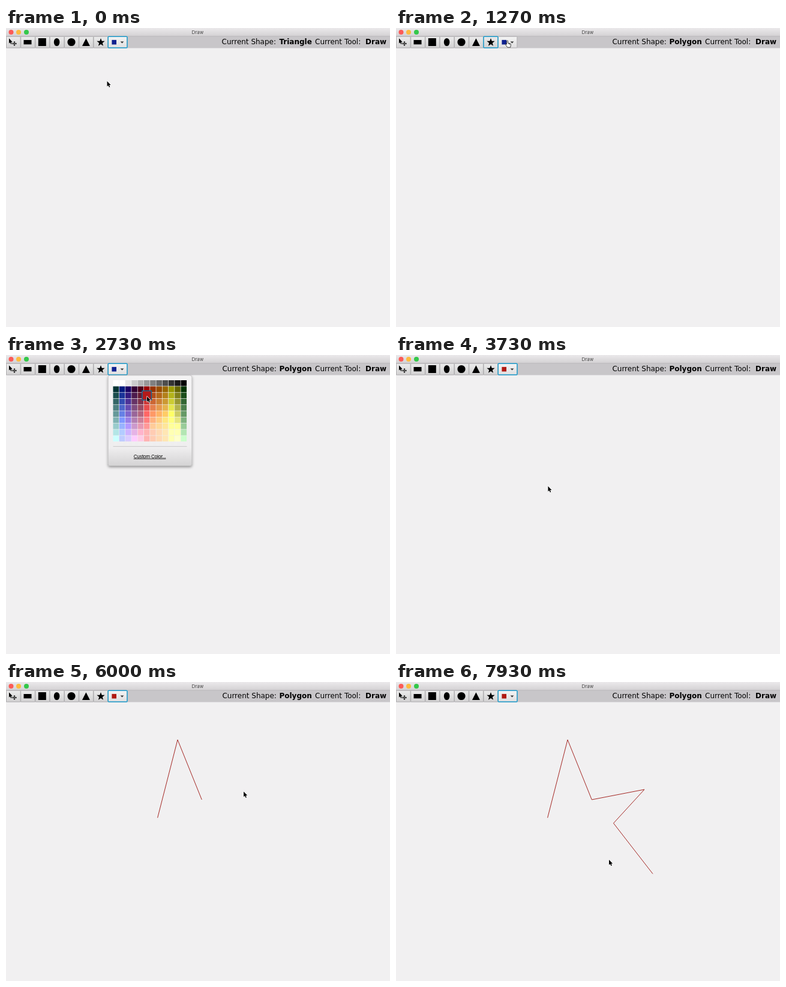
An HTML page for the animation above (8 s loop, 640 by 498 pixels).

```html
<!DOCTYPE html>
<html lang="en">
<head>
<meta charset="utf-8">
<title>Draw</title>
<style>
  html, body { margin: 0; width: 100%; height: 100%; overflow: hidden; background: #f1f0f1; }
  svg { display: block; width: 640px; height: 498px; }
  text { font: 12px "DejaVu Sans", Verdana, sans-serif; fill: #000; }
  .bold { font-weight: bold; }
  .small { font: 8px Inter, sans-serif; text-anchor: middle; }
  .title { fill: #444; }
  .custom { letter-spacing: -.3px; text-decoration: underline; }
  .end { text-anchor: end; }
</style>
</head>
<body>
<svg viewBox="0 0 640 498">
  <defs>
    <linearGradient id="bar" x2="0" y2="1">
      <stop stop-color="#ebe9eb"/><stop offset="1" stop-color="#d3d1d3"/>
    </linearGradient>
    <linearGradient id="face" x2="0" y2="1">
      <stop stop-color="#ececec"/><stop offset="1" stop-color="#d2d1d2"/>
    </linearGradient>
    <linearGradient id="lit" x2="0" y2="1">
      <stop stop-color="#f4f4f4"/><stop offset="1" stop-color="#e0dfe0"/>
    </linearGradient>
    <linearGradient id="sheet" x2="0" y2="1">
      <stop stop-color="#f4f3f4"/><stop offset=".8" stop-color="#efeeef"/><stop offset="1" stop-color="#d4d3d4"/>
    </linearGradient>
    <filter id="shadow" x="-10%" y="-10%" width="120%" height="125%">
      <feDropShadow dx="0" dy="2" stdDeviation="2" flood-opacity=".4"/>
    </filter>
    <path id="pointer" d="M0 0V8.9L2 7.1 3.4 10.3 4.9 9.7 3.5 6.5H6.2Z"/>
  </defs>

  <rect width="640" height="498" fill="#f1f0f1"/>
  <rect width="640" height="14" fill="url(#bar)"/>
  <rect y="14" width="640" height="19.5" fill="#c8c6c9"/>
  <path d="M0 13.7H640" stroke="#b3b1b3" stroke-width=".7"/>
  <circle cx="8.5" cy="7" r="4" fill="#fc5b57"/>
  <circle cx="21" cy="7" r="4" fill="#fdbc40"/>
  <circle cx="34" cy="7" r="4" fill="#34c84a"/>
  <text class="small title" x="319.5" y="10">Draw</text>

  <g id="buttons" stroke="#a9a8aa" stroke-width=".8"></g>
  <use href="#pointer" transform="translate(5 17.2) scale(.95)"/>
  <path d="M14 22l1.6 2H14.5V25.5H16V24.4L18 26 16 27.6V26.5H14.5V28H15.6L14 30 12.4 28H13.5V26.5H12V27.6L10 26 12 24.4V25.5H13.5V24H12.4Z"/>
  <rect x="29.5" y="20" width="13" height="7.3"/>
  <rect x="53.8" y="17" width="13" height="13"/>
  <ellipse cx="84.6" cy="23.5" rx="4.8" ry="6.6"/>
  <circle cx="109" cy="23.5" r="6.6"/>
  <path d="M133.4 17.2L139.9 30H126.9Z"/>
  <path id="star"/>
  <rect id="swatch" x="176.4" y="19.9" width="7.6" height="7.6"/>
  <path d="M190.6 22.4H196.4L193.5 25.4Z" fill="#333"/>
  <rect id="ring" y="14.2" height="18.8" rx="1.2" fill="none" stroke="#1f9fcf" stroke-width="1.5"/>

  <text id="label" y="27">Current Shape:</text>
  <text id="shape" class="bold end" x="509.8" y="27"></text>
  <text x="515" y="27">Current Tool:</text>
  <text class="bold" x="599" y="27">Draw</text>

  <path id="poly" fill="none" stroke="#a01c18" stroke-width=".95"/>

  <g id="popup">
    <rect x="170.2" y="34" width="139.6" height="150.6" rx="3" fill="url(#sheet)" stroke="#b9b8b9" stroke-width=".7" filter="url(#shadow)"/>
    <g id="cells"></g>
    <path d="M178.5 152.3H301.5" stroke="#c8c7c8"/>
    <text class="small custom" x="239.6" y="171.6">Custom Color...</text>
    <rect id="hover" width="15.4" height="15.4" stroke="#0b6f9c" stroke-width="1.4"/>
  </g>

  <g id="cursor" stroke-linejoin="round">
    <use id="arrow" href="#pointer" stroke="#fff" stroke-width="1.3" paint-order="stroke"/>
    <path id="hand" fill="#fff" stroke="#111" stroke-width=".8"
      d="M-1 6.4V.9a1 1 0 0 1 2 0V4.2l3.6.7q1.5.4 1.3 1.9L5.2 11.2H.3L-2.8 7.1q-.7-1.2.5-1.4ZM2.6 4.6V6.3M4.2 5V6.6"/>
  </g>
</svg>
<script>
const LOOP = 8000, STEP = 1000 / 15;
const STAR_CLICK = 860, OPEN = 1460, PICK = 2860;

const $ = id => document.getElementById(id);
const set = (el, attrs) => { for (const k in attrs) el.setAttribute(k, attrs[k]); return el; };
const addRect = (parent, attrs) =>
  parent.appendChild(set(document.createElementNS("http://www.w3.org/2000/svg", "rect"), attrs));
const show = (el, on) => el.style.display = on ? "" : "none";

// Toolbar: seven tools and a wider colour picker
const edge = i => i < 8 ? i * 24.28 : 202;
for (let i = 0; i < 8; i++)
  addRect($("buttons"), {
    x: edge(i) + .4, y: 14.2, width: edge(i + 1) - edge(i) - .6, height: 18.8, rx: 1,
    fill: i < 7 ? "url(#face)" : "url(#lit)"
  });

const starPoints = Array.from({ length: 10 }, (_, i) => {
  const a = i * Math.PI / 5, r = i % 2 ? 2.9 : 7;
  return `${158 + r * Math.sin(a)} ${24 - r * Math.cos(a)}`;
});
set($("star"), { d: `M${starPoints.join("L")}Z` });

// Palette: greys on top, then dark tones (r, g, b in tenths) that lighten
// by a tenth per row, the weaker channels stopping short of white
const PITCH = 10.27, LEFT = 178.5, TOP = 42;
const tones = "022 015 104 202 301 600 620 630 640 660 440 020".split(" ");
function cellColor(col, row) {
  const base = [...tones[col]].map(Number), top = Math.max(...base);
  const rgb = row
    ? base.map(v => Math.min(v + row - 1, 10 - (top - v) / 2))
    : Array(3).fill(Math.min(10, 11 - col));
  return `rgb(${rgb.map(v => Math.round(v * 25.5))})`;
}
const cellAt = (x, y) => [Math.floor((x - LEFT) / PITCH), Math.floor((y - TOP) / PITCH)];
for (let row = 0; row < 10; row++)
  for (let col = 0; col < 12; col++)
    addRect($("cells"), {
      x: LEFT + col * PITCH, y: TOP + row * PITCH, width: 9.6, height: 9.6, fill: cellColor(col, row)
    });

// Polygon corners, clicked at a steady pace after the first
const corners = [[252.6, 226.2], [286, 96.2], [326.3, 196], [414, 179], [362.5, 235.2], [428, 319.5]];
const clickTime = i => i ? 4860 + 685 * (i - 1) : 3870;
const exit = [241, 259];

// Cursor moves: start time, duration, destination
const moves = [
  [200, 600, 158, 22],
  [950, 300, 185.5, 21],
  [1530, 624, 284, 146],
  [2250, 400, 235, 69],
  [2900, 300, 258, 232],
  [3230, 170, 253.4, 218.5],
  [3760, 100, ...corners[0]],
  ...[...corners.slice(1), exit].map((p, i) => [clickTime(i) + 150, 430, ...p])
];
function ease(u) {
  u = Math.max(0, Math.min(1, u));
  return u * u * (3 - 2 * u);
}
const cursorAt = t => moves.reduce(([x, y], [from, span, toX, toY]) => {
  const s = ease((t - from) / span);
  return [x + (toX - x) * s, y + (toY - y) * s];
}, [168.5, 88.5]);

function draw(t) {
  const [x, y] = cursorAt(t);
  const polygon = t >= STAR_CLICK;
  const open = t >= OPEN && t < PICK;
  const overBar = y > 14 && y < 33;

  const focus = polygon && t < OPEN ? 6 : 7;
  set($("ring"), { x: edge(focus) + .2, width: edge(focus + 1) - edge(focus) - .2 });
  set($("swatch"), { fill: t < PICK ? "#10218f" : "#b01a12" });
  set($("label"), { x: polygon ? 360.4 : 359.5 });
  $("shape").textContent = polygon ? "Polygon" : "Triangle";

  // The highlighted cell trails the cursor a little
  const [col, row] = cellAt(...cursorAt(t - 50));
  const inside = col >= 0 && col < 12 && row >= 0 && row < 10;
  show($("popup"), open);
  show($("hover"), inside);
  if (inside) set($("hover"), {
    x: LEFT + col * PITCH - 2.9, y: TOP + row * PITCH - 2.9, fill: cellColor(col, row)
  });

  // The first corner shows only once a second one joins it
  const seen = corners.filter((_, i) => t >= clickTime(i));
  set($("poly"), { d: seen.length > 1 ? `M${seen.join("L")}` : "" });

  set($("cursor"), { transform: `translate(${x} ${y})` });
  show($("hand"), overBar);
  show($("arrow"), !overBar);
}

// The picture advances 15 times a second
const start = performance.now();
function tick() {
  const t = (performance.now() - start) % LOOP;
  draw(Math.floor(t / STEP + .06) * STEP);
  requestAnimationFrame(tick);
}
tick();
</script>
</body>
</html>
```
